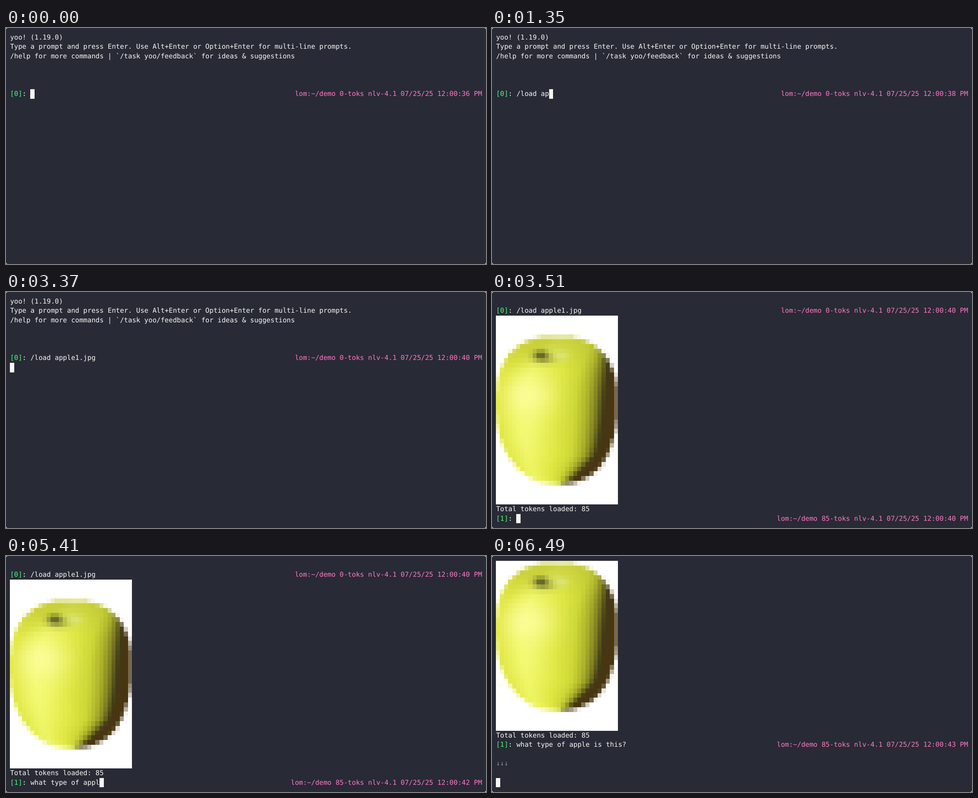
An HTML page with a canvas that plays this animation: 991x490 px, repeating every 8 s.

```html
<!DOCTYPE html>
<html lang="en">
<head>
<meta charset="utf-8">
<title>Terminal session</title>
<style>
  html, body { margin: 0; width: 100%; height: 100%; overflow: hidden; background: #fff; }
  #stage { position: relative; width: 991px; height: 490px; overflow: hidden; border-radius: 4px; background: #282a36; }
  #view { position: absolute; left: 0; top: 10px; width: 991px; height: 470px; overflow: hidden; }
  #photo { position: absolute; left: 8px; width: 252px; height: 392px; image-rendering: pixelated; }
  svg { position: absolute; left: 0; top: 0; }
  text { font: 14px "DejaVu Sans Mono", monospace; white-space: pre; text-rendering: geometricPrecision; }
  rect { shape-rendering: crispEdges; }
</style>
</head>
<body>
<div id="stage">
  <div id="view"><canvas id="photo" width="30" height="40"></canvas></div>
  <svg id="term" width="991" height="490" viewBox="0 0 991 490"></svg>
</div>
<script>
const LOOP = 8000, CW = 8.4, LH = 19.6, COLS = 116;
const BG = '#282a36', FG = '#f8f8f2', GREEN = '#50fa7b', PINK = '#ff79c6', DIM = '#909194', GRAY = '#6272a4';
const term = document.getElementById('term');
const photo = document.getElementById('photo');

// ---- terminal cells ----
const left = col => CW * (col + 1);
const top_ = row => LH * (row + 0.5);

function add(name, attrs, content) {
  const el = document.createElementNS('http://www.w3.org/2000/svg', name);
  for (const key in attrs) el.setAttribute(key, attrs[key]);
  if (content) el.textContent = content;
  term.appendChild(el);
}

function write(row, col, str, fill = FG) {
  const x = [...str].map((_, i) => left(col + i).toFixed(1)).join(' ');
  add('text', { x, y: (top_(row) + 14).toFixed(1), fill }, str);
}

function block(row, col, width = 1, fill = FG) {
  add('rect', { x: left(col), y: top_(row), width: CW * width, height: LH, fill });
}

function prompt(row, index, typed, tokens, sec) {
  const status = `lom:~/demo ${tokens}-toks nlv-4.1 07/25/25 12:00:${sec} PM`;
  write(row, 0, `[${index}]`, GREEN);
  write(row, 3, ': ' + typed);
  write(row, COLS - status.length, status, PINK);
}

// ---- timeline ----
const spread = (a, b, n) => Array.from({ length: n }, (_, i) => a + (b - a) * i / (n - 1));
const passed = (times, t) => times.filter(k => k <= t).length;

const COMMAND = '/load apple', QUESTION = 'what type of apple is this?';
const commandKeys = [530, 800, ...spread(970, 1350, 6), ...spread(1500, 1810, 4).slice(0, 3)];
const questionKeys = [...spread(4040, 4120, 2), ...spread(4350, 4700, 5), ...spread(4770, 5090, 6),
  ...spread(5170, 5960, 11), ...spread(6010, 6080, 2), 6250];
const MENU = 1810, ACCEPT = 2510, ENTER = 3370, LOADED = 3510, SEND = 6490;
const events = [0, ...commandKeys, MENU, ACCEPT, ENTER, LOADED, ...questionKeys, SEND];

// The clock is refreshed only by a key press.
const clock = t => 37 + Math.floor((t - 185) / 1000);

function drawCommand(t) {
  write(0, 0, 'yoo! (1.19.0)');
  write(1, 0, 'Type a prompt and press Enter. Use Alt+Enter or Option+Enter for multi-line prompts.');
  write(2, 0, '/help for more commands | `/task yoo/feedback` for ideas & suggestions');
  const typed = t < ACCEPT ? COMMAND.slice(0, passed(commandKeys, t)) : COMMAND + '1.jpg ';
  prompt(6, 0, typed, 0, clock(t));
  if (t >= ENTER) block(7, 0);
  else block(6, 5 + typed.length);
  if (t >= MENU && t < ACCEPT) {
    block(7, 0, 10, GREEN);
    for (let i = 0; i < 3; i++) write(7, 29 * i, `apple${i + 1}.jpg`, i ? GRAY : BG);
  }
}

function drawChat(t) {
  const sent = t >= SEND, base = sent ? -3 : 1;
  const typed = QUESTION.slice(0, passed(questionKeys, t));
  if (!sent) prompt(base, 0, COMMAND + '1.jpg', 0, 40);
  photo.style.top = Math.round(top_(base + 1)) - 10 + 'px';
  write(base + 21, 0, 'Total tokens loaded: 85');
  prompt(base + 22, 1, typed, 85, clock(t));
  if (sent) {
    write(21, 0, '↓↓↓', DIM);
    block(23, 0);
  } else block(23, 5 + typed.length);
}

// ---- blocky apple ----
const clamp = v => Math.max(0, Math.min(1, v));
const mix = (a, b, k) => a.map((v, i) => v + (b[i] - v) * k);
const glow = (x, y, cx, cy, rx, ry) => Math.exp(-(((x - cx) / rx) ** 2) - ((y - cy) / ry) ** 2);
const WHITE = [255, 255, 255];
const TONES = [
  [-1.6, [222, 229, 62]], [-1.2, [238, 245, 98]], [-0.67, [223, 231, 67]], [-0.34, [205, 215, 54]],
  [-0.14, [172, 177, 43]], [0, [127, 128, 34]], [0.13, [65, 57, 24]], [0.25, [72, 54, 16]]
];

function tone(s) {
  const i = TONES.findIndex(p => p[0] > s);
  if (i === 0) return TONES[0][1];
  if (i < 0) return TONES[TONES.length - 1][1];
  const [a, ca] = TONES[i - 1], [b, cb] = TONES[i];
  return mix(ca, cb, (s - a) / (b - a));
}

function apple(x, y) {
  const upper = y < 230;
  const v = upper ? (230 - y) / 138 : (y - 230) / 169;
  if (v >= 1) return WHITE;
  const n = upper ? 2.5 : 2.3;
  const half = 125 * (1 - v ** n) ** (1 / n);
  const u = (x - 134 - 4 * clamp((y - 300) / 80)) / half;
  if (Math.abs(u) > 1) return WHITE;
  const edge = 0.62 + 0.33 * Math.exp((130 - y) / 40) - 0.25 * clamp((y - 340) / 50);
  let c = tone(u - edge);
  const lit = clamp((edge - u) * 4);
  c = mix(c, [188, 196, 56], 0.65 * lit * clamp((165 - y) / 60));
  c = mix(c, [255, 255, 168], 0.75 * glow(x, y, 75, 215, 52, 45));
  c = mix(c, [252, 255, 140], 0.4 * glow(x, y, 72, 285, 40, 60));
  c = mix(c, [226, 234, 150], 0.7 * glow(x, y, 141, 132, 17, 9));
  c = mix(c, [120, 122, 40], 0.6 * glow(x, y, 108, 139, 20, 8));
  return mix(c, [72, 72, 32], 0.9 * glow(x, y, 101, 131, 14, 9));
}

function paintPhoto() {
  const ctx = photo.getContext('2d'), N = 4;
  for (let r = 0; r < 40; r++) for (let c = 0; c < 30; c++) {
    let sum = [0, 0, 0];
    for (let k = 0; k < N * N; k++) {
      const x = left(c + (k % N + 0.5) / N);
      const y = 49 + 9.8 * (r + (Math.floor(k / N) + 0.5) / N);
      sum = apple(x, y).map((v, i) => v + sum[i]);
    }
    ctx.fillStyle = `rgb(${sum.map(v => Math.round(v / N / N))})`;
    ctx.fillRect(c, r, 1, 1);
  }
}

// ---- playback ----
let shown = -1;
function show(t) {
  const step = passed(events, t);
  if (step === shown) return;
  shown = step;
  const at = events[step - 1];
  term.textContent = '';
  photo.style.display = at < LOADED ? 'none' : 'block';
  if (at < LOADED) drawCommand(at);
  else drawChat(at);
}

paintPhoto();
const start = performance.now();
function frame() {
  show((performance.now() - start) % LOOP);
  requestAnimationFrame(frame);
}
frame();
</script>
</body>
</html>
```
